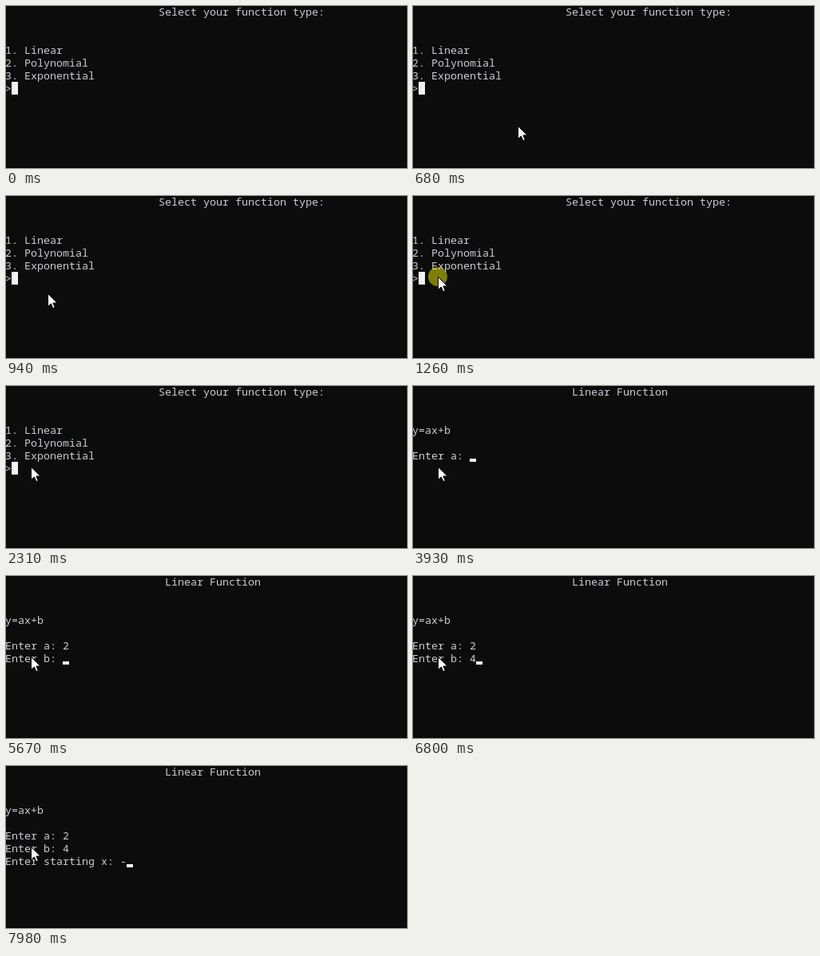
Animation, 502 px wide and 203 px high, one loop 8000 ms. Source, as an HTML page:

```html
<!DOCTYPE html>
<html lang="en">
<head>
<meta charset="utf-8">
<title>Console function menu</title>
<style>
  html, body { margin: 0; width: 100%; height: 100%; overflow: hidden; background: #0c0c0c; }
  svg { display: block; width: 502px; height: 203px; }
  text { font: 13.333px "Noto Sans Mono", "DejaVu Sans Mono", monospace; fill: #c9ced2; white-space: pre; }
</style>
</head>
<body>
<svg viewBox="0 0 502 203" xmlns="http://www.w3.org/2000/svg">
  <rect width="502" height="203" fill="#0c0c0c"/>
  <rect y="202" width="502" height="1" fill="#040404"/>
  <g id="lines"></g>
  <rect id="block" x="7" y="95" width="8" height="12" fill="#f2f2f2"/>
  <rect id="caret" width="8" height="4" fill="#f2f2f2"/>
  <circle id="click" cx="31" cy="101" r="12" fill="#ff0" fill-opacity=".47"/>
  <path id="mouse" d="M.5 .5V16.5L4.3 13L6.8 18.7L9.3 17.6L6.9 12H12Z" fill="#fff" stroke="#000"/>
</svg>
<script>
const LOOP = 8000, CELL = 8, ROW = 16;
const $ = id => document.getElementById(id);
const show = (el, on) => el.setAttribute("visibility", on ? "visible" : "hidden");

// One text element per console row; column 0 starts one pixel off stage.
const rows = Array.from({ length: 8 }, (_, i) => {
  const el = document.createElementNS("http://www.w3.org/2000/svg", "text");
  el.setAttribute("y", i * ROW + 12);
  return $("lines").appendChild(el);
});

function print(row, str, col = 0) {
  rows[row].setAttribute("x", col * CELL - 1);
  rows[row].textContent = str;
}

function caret(col, row, on) {
  $("caret").setAttribute("x", col * CELL - 1);
  $("caret").setAttribute("y", row * ROW + 11);
  show($("caret"), on);
}

function menu(t) {
  const typed = t >= 3250;
  print(0, "Select your function type:", 24);
  print(3, "1. Linear");
  print(4, "2. Polynomial");
  print(5, "3. Exponential");
  print(6, typed ? ">1" : ">");
  show($("block"), !typed);
  if (typed) caret(2, 6, t < 3370);
  else caret(1, 6, t < 1810 || (t >= 2310 && t < 2870));
}

function linear(t) {
  print(0, "Linear Function", 25);
  print(3, "y=ax+b");
  print(5, "Enter a: " + (t >= 5170 ? "2" : ""));
  if (t >= 5670) print(6, "Enter b: " + (t >= 6800 ? "4" : ""));
  if (t >= 6920) print(7, "Enter starting x: " + (t >= 7980 ? "-" : ""));
  show($("block"), false);

  if (t < 5170) caret(9, 5, t < 4990);
  else if (t < 5670) caret(10, 5, t < 5490);
  else if (t < 6800) caret(9, 6, t < 6550);
  else if (t < 6920) caret(10, 6, true);
  else if (t < 7980) caret(18, 7, t < 7600);
  else caret(19, 7, true);
}

// The pointer slides in from the lower right in sampled, slowing steps.
function pointer(t) {
  const step = t < 680 ? Math.floor((t - 560) / 60) : 2 + Math.floor((t - 680) / 70);
  const left = step < 10 ? Math.pow(0.59, step - 2) : 0;
  const x = Math.round(31 + 100 * left);
  const y = Math.round(101 + 49 * Math.pow(left, 0.55));
  $("mouse").setAttribute("transform", `translate(${x} ${y})`);
  show($("mouse"), t >= 560);
  show($("click"), t >= 1260 && t < 1380);
}

function draw(t) {
  rows.forEach(r => r.textContent = "");
  (t < 3930 ? menu : linear)(t);
  pointer(t);
}

const start = performance.now();
function tick(now) {
  draw(Math.max(0, now - start) % LOOP);
  requestAnimationFrame(tick);
}
draw(0);
requestAnimationFrame(tick);
</script>
</body>
</html>
```
